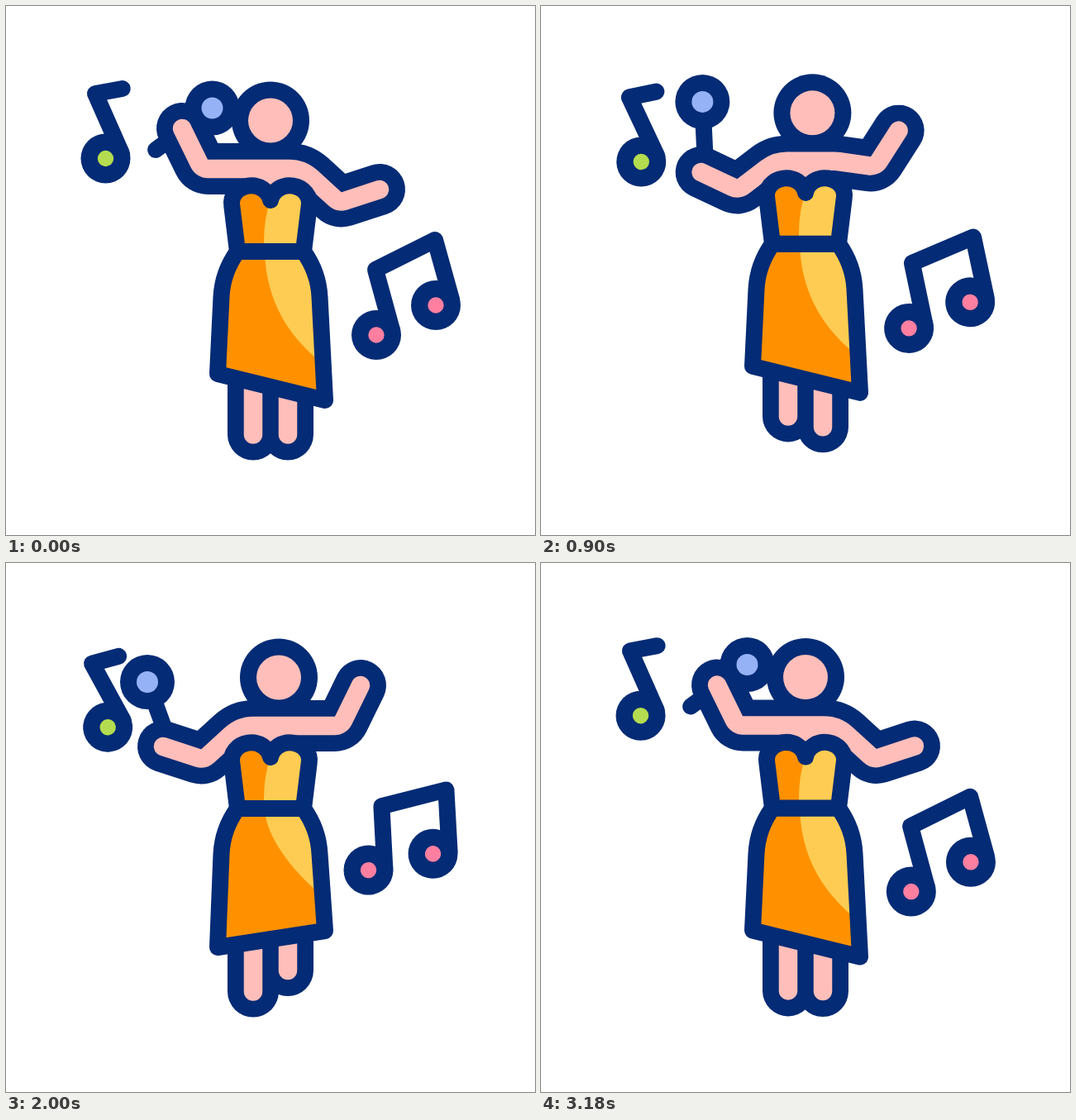
Recreate the animation shown at these times as an HTML page with a canvas. Size 640 by 640 pixels, loop 3200 ms.

```html
<!DOCTYPE html>
<html lang="en">
<head>
<meta charset="utf-8">
<title>Singer</title>
<style>
html, body { margin: 0; width: 100%; height: 100%; overflow: hidden; background: #fff; }
canvas { display: block; width: 640px; height: 640px; }
</style>
</head>
<body>
<canvas width="640" height="640"></canvas>
<script>
const ctx = document.querySelector('canvas').getContext('2d');
const NAVY = '#042b75', SKIN = '#ffbeb9', ORANGE = '#ff9100', YELLOW = '#fecc52';
const LOOP = 3200, DANCE = 1600, BEAT = 400, HOP = 18, KICK = 25.5;

const lerp = (a, b, k) => a + (b - a) * k;
const mix = (p, q, k) => p.map((v, i) => lerp(v, q[i], k));
const clamp = x => Math.min(1, Math.max(0, x));
const smooth = x => x * x * (3 - 2 * x);
const radians = deg => deg * Math.PI / 180;

// Eased rise and fall centred on `mid`
const bump = (t, mid, half) => smooth(clamp(1 - Math.abs(t - mid) / half));

function line(points, width, color) {
  ctx.beginPath();
  points.forEach(p => ctx.lineTo(...p));
  stroke(width, color);
}

function stroke(width, color, path) {
  ctx.lineWidth = width;
  ctx.strokeStyle = color;
  path ? ctx.stroke(path) : ctx.stroke();
}

function disc(x, y, r, color) {
  ctx.beginPath();
  ctx.arc(x, y, r, 0, 7);
  ctx.fillStyle = color;
  ctx.fill();
}

function ring(x, y, r, inner, color) {
  disc(x, y, r, NAVY);
  disc(x, y, inner, color);
}

// Skin-coloured strokes that share one outline
function limbs(trace) {
  ctx.beginPath();
  trace();
  stroke(62, NAVY);
  stroke(22.5, SKIN);
}

// Two-tone cloth with a dark outline
function cloth(outline, light) {
  const path = new Path2D(outline);
  ctx.fillStyle = ORANGE;
  ctx.fill(path);
  ctx.save();
  ctx.clip(path);
  ctx.fillStyle = YELLOW;
  ctx.fill(new Path2D(light));
  ctx.restore();
  stroke(20, NAVY, path);
}

function note(x, y, degrees, stem, heads, color) {
  ctx.save();
  ctx.translate(x, y);
  ctx.rotate(radians(degrees));
  line(stem, 20, NAVY);
  heads.forEach(([hx, hy]) => ring(hx, hy, 30, 9.7, color));
  ctx.restore();
}

const ARMS = [[213, 148], [237, 197], [284, 197], [358, 197], [403, 238], [452, 222]];
const MIRRORED = ARMS.map(([x, y]) => [642 - x, y]).reverse();

function arms(sway) {
  const joints = ARMS.map((p, i) => mix(p, MIRRORED[i], sway));
  limbs(() => {
    ctx.moveTo(...joints[0]);
    for (let i = 1; i < 5; i++) {
      const shoulder = i === 2 || i === 3;
      ctx.arcTo(...joints[i], ...joints[i + 1], shoulder ? 40 : 12);
    }
    ctx.lineTo(...joints[5]);
  });
  ctx.fillStyle = SKIN;
  ctx.fillRect(296, 196, 48, 36);
}

// Microphone head x, y and handle angle: at the mouth, halfway, held out
const MIC = [[249.5, 123.5, 143.6], [219, 117, 104], [171, 144, 70]];

function microphone(swing) {
  const i = swing < 0.5 ? 0 : 1, k = smooth(swing * 2 - i);
  const [x, base, deg] = mix(MIC[i], MIC[i + 1], k);
  const y = base - 21 * k * (1 - k), a = radians(deg);
  line([[x, y], [x + 85 * Math.cos(a), y + 85 * Math.sin(a)]], 20, NAVY);
  ring(x, y, 33, 13, '#96b2f6');
}

function dress(tilt) {
  const left = lerp(445, 465, tilt), right = lerp(477, 445, tilt), edge = lerp(426, 396, tilt);
  cloth(`M280 297Q262 322 260.5 352L256 ${left}L386 ${right}L379.5 352Q378 322 360 297Z`,
    `M313 300C316 ${edge - 64} 345 ${edge - 26} 375 ${edge}L420 ${edge}V290H313Z`);
  cloth('M280 297L273.3 242A23.5 21 0 0 1 320 235A23.5 21 0 0 1 366.7 242L360 297Z',
    'M320 235Q310 262 312.5 300H400V200H320Z');
}

function singer(t) {
  const hop = bump(t % BEAT, BEAT / 2, BEAT / 2);
  const tilt = bump(t % (2 * BEAT), BEAT, BEAT / 2);
  // Arms swing out for one beat, hold one, return in one, rest one
  const swing = clamp(1.5 - Math.abs(t - 1.5 * BEAT) / BEAT);
  const sway = smooth(swing);

  ctx.save();
  ctx.translate(0, -HOP * hop);
  limbs(() => [hop, tilt].forEach((lift, i) => {
    const x = 299 + 42 * i;
    ctx.moveTo(x, 400);
    ctx.lineTo(x, 518.5 - KICK * lift);
  }));
  microphone(swing);
  ring(320 + 10 * sway, 138.5, 47, 27, SKIN);
  arms(sway);
  dress(tilt);
  ctx.restore();
}

const TURNS = [0, 400, 1000, 1600, 2200, 2680, LOOP];

function notes(t) {
  const i = TURNS.findIndex(turn => turn > t) - 1;
  const k = smooth((t - TURNS[i]) / (TURNS[i + 1] - TURNS[i]));
  const n = i % 2 ? 1 - k : k;
  const rise = i === 2 || i === 3 ? 68 : 80;
  note(114.25 - 2.5 * n, 145 + 58 * n, -19 * n,
    [[26.5, -45], [-6.25, -39], [25.5, 33]], [[6.25, 39.5]], '#b4dc50');
  note(483.5 + 8 * n, 340 - rise * n, 48 * n,
    [[-16.5, 52], [-36.5, -21], [35.5, -57], [55.5, 15]], [[-35.5, 58], [36.5, 22]], '#ff7fa1');
}

const start = performance.now();
function draw() {
  const t = Math.max(0, performance.now() - start) % LOOP;
  ctx.clearRect(0, 0, 640, 640);
  ctx.lineCap = ctx.lineJoin = 'round';
  notes(t);
  singer(t % DANCE);
  requestAnimationFrame(draw);
}
draw();
</script>
</body>
</html>
```
